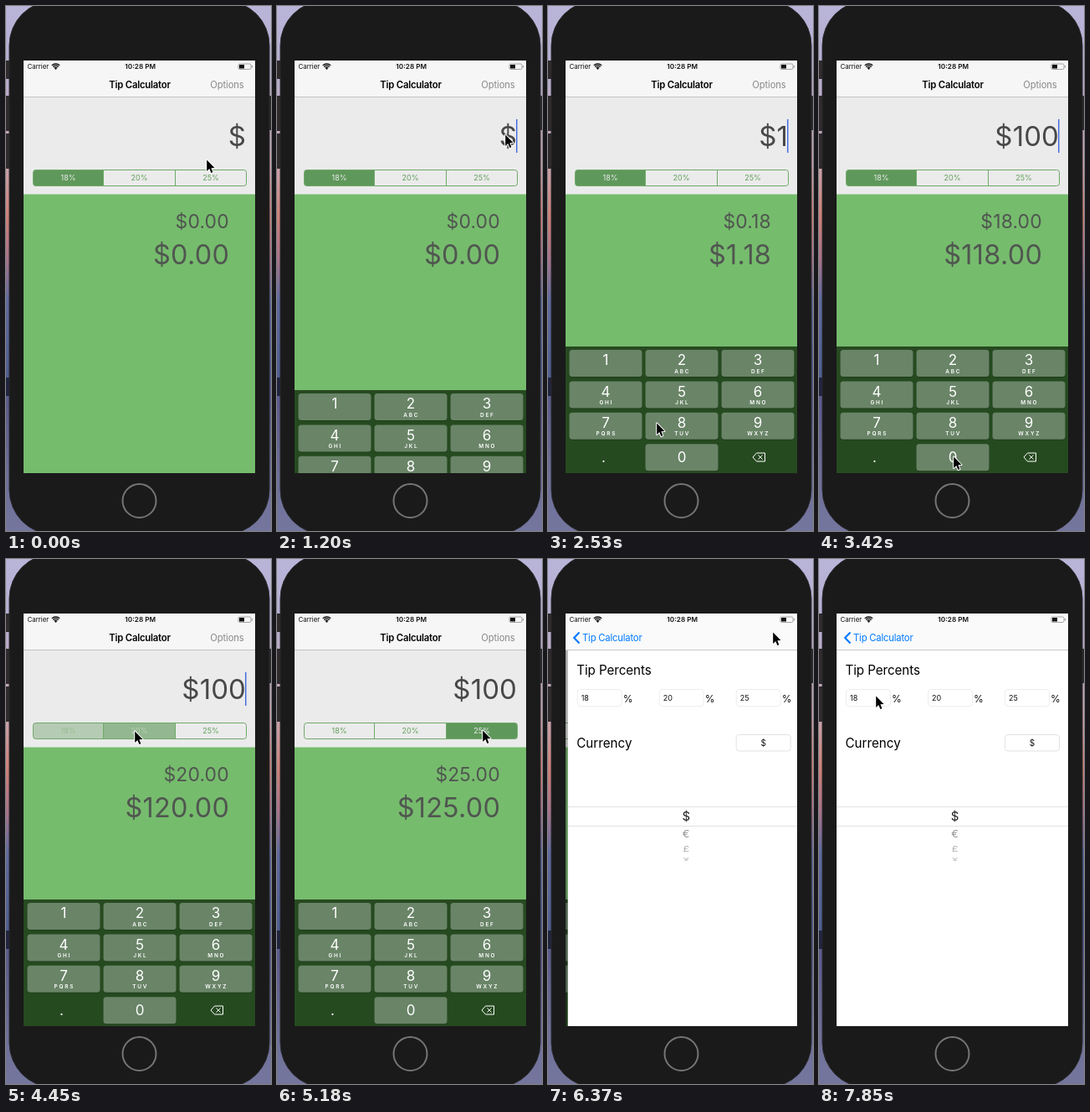
Write an HTML page with a canvas that moves like this. It is 317 by 626 pixels and loops after 8 s.

```html
<!DOCTYPE html>
<html lang="en">
<head>
<meta charset="utf-8">
<title>Tip Calculator</title>
<style>
html, body { margin: 0; width: 100%; height: 100%; overflow: hidden; background: #1a1a1a; }
canvas { display: block; width: 317px; height: 626px; }
</style>
</head>
<body>
<canvas id="stage"></canvas>
<script>
const W = 317, H = 626, LOOP = 8000;
const SCREEN = { x: 21, y: 65, w: 277, h: 492 };
const GREEN = '#76bc6d', SEGMENT = [95, 152, 91], PALE = [235, 235, 235], BLUE = '#007aff';
const RATES = [18, 20, 25];
const canvas = document.getElementById('stage');
const ratio = window.devicePixelRatio || 1;
canvas.width = Math.round(W * ratio);
canvas.height = Math.round(H * ratio);
const ctx = canvas.getContext('2d');

// Pointer path: [step, x, y]
const PATH = [
  [0, 239, 182], [2, 200, 262], [3, 186, 287], [6, 272, 152], [9, 272, 152],
  [14, 70, 425], [16, 72, 428], [17, 129, 496], [18, 158, 556], [19, 160, 536],
  [23, 160, 536], [28, 155, 206], [30, 153, 204], [31, 153, 204], [33, 243, 203],
  [34, 245, 203], [37, 268, 86], [43, 268, 86], [49, 85, 150], [50, 72, 159],
  [51, 63, 161], [52, 63, 161], [53, 67, 162]
];

const mix = (a, b, t) => `rgb(${a.map((v, i) => Math.round(v + (b[i] - v) * t))})`;

function rect(x, y, w, h, fill) {
  ctx.fillStyle = fill;
  ctx.fillRect(x, y, w, h);
}

// A band across the full width of the screen
const band = (y, h, fill) => rect(SCREEN.x, y, SCREEN.w, h, fill);

function rounded(x, y, w, h, r, fill, stroke, width = 1) {
  ctx.beginPath();
  ctx.roundRect(x, y, w, h, r);
  if (fill) { ctx.fillStyle = fill; ctx.fill(); }
  if (stroke) { ctx.strokeStyle = stroke; ctx.lineWidth = width; ctx.stroke(); }
}

function line(points, color, width, close) {
  ctx.beginPath();
  points.forEach(([x, y]) => ctx.lineTo(x, y));
  if (close) ctx.closePath();
  ctx.strokeStyle = color;
  ctx.lineWidth = width;
  ctx.stroke();
}

// y is the middle of the capital letters
function text(str, x, y, size, color, { align = 'left', weight = 400, spacing = 0 } = {}) {
  ctx.font = `${weight} ${size}px Inter, "Open Sans", sans-serif`;
  ctx.letterSpacing = spacing + 'px';
  ctx.textAlign = align;
  ctx.fillStyle = color;
  ctx.fillText(str, x, y + size * 0.364);
}

function clipped({ x, y, w, h }, draw) {
  ctx.save();
  ctx.beginPath();
  ctx.rect(x, y, w, h);
  ctx.clip();
  draw();
  ctx.restore();
}

function drawPhone() {
  const sky = ctx.createLinearGradient(0, 0, 0, H);
  [[0, '#b9b5d9'], [0.12, '#b5aed0'], [0.3, '#c9a5ae'], [0.4, '#cf8179'], [0.48, '#a9748a'],
   [0.56, '#606b9f'], [0.7, '#505f92'], [0.76, '#5d5c8c'], [0.9, '#6f7099'], [1, '#74769e']]
    .forEach(([at, color]) => sky.addColorStop(at, color));
  rect(0, 0, W, H, sky);
  rect(0, 443, 6, 22, '#20243f');
  [[65, 22], [107, 42], [152, 42]].forEach(([y, h]) => rect(0, y, 6, h, '#2f2a2c'));
  rect(313, 107, 4, 41, '#2a2628');
  rounded(4, -6, 311, 636, 53, '#1a1a1a', '#29292d', 1);
  ctx.beginPath();
  ctx.arc(159.5, 590, 20, 0, 7);
  ctx.strokeStyle = '#757575';
  ctx.lineWidth = 2;
  ctx.stroke();
}

function drawStatus() {
  text('Carrier', 25.5, 72.5, 8, '#111', { spacing: -0.05 });
  text('10:28 PM', 160.7, 72.5, 8.2, '#111', { align: 'center', weight: 600 });
  ctx.strokeStyle = '#111';
  ctx.lineWidth = 1.3;
  [2.6, 4.8, 7].forEach(r => {
    ctx.beginPath();
    ctx.arc(59.5, 76, r, -Math.PI * 0.74, -Math.PI * 0.26);
    ctx.stroke();
  });
  ctx.beginPath();
  ctx.arc(59.5, 74.8, 1, 0, 7);
  ctx.fillStyle = '#111';
  ctx.fill();
  rounded(278, 69, 15, 6.5, 1.5, null, '#8d8d8d', 0.8);
  rect(279, 70, 6, 4.5, '#111');
  rect(294, 71, 1, 2.5, '#999');
}

function drawCalculatorBar(k) {
  band(65, 44, '#f6f6f6');
  band(108, 1, '#c4c4c4');
  text('Tip Calculator', 160, 94, 11.3, '#000', { align: 'center', weight: 600, spacing: -0.2 });
  const fade = k < 40 ? 0 : k < 41 ? 0.45 : 0.82;
  text('Options', 284.6, 94, 11.2, mix([137, 137, 137], [246, 246, 246], fade), { align: 'right', spacing: -0.1 });
}

function drawSettingsBar() {
  band(65, 44, '#fafafa');
  band(108, 1, '#c8c8c8');
  line([[37.5, 87.5], [31.2, 94], [37.5, 100.5]], BLUE, 2.2);
  text('Tip Calculator', 41, 94, 11.3, BLUE, { spacing: -0.2 });
}

// How strongly each segment is filled
function segmentWeights(k) {
  if (k < 30) return [1, 0, 0];
  if (k < 31) return [0.38, 0.63, 0];
  if (k < 33) return [0, 1, 0];
  if (k < 34) return [0, 0.38, 0.63];
  return [0, 0, 1];
}

function drawSegments(k) {
  const edges = [32.5, 116.5, 202.5, 287.5];
  ctx.save();
  ctx.beginPath();
  ctx.roundRect(32.5, 195.5, 255, 19, 3);
  ctx.clip();
  segmentWeights(k).forEach((weight, i) => {
    const x = edges[i], w = edges[i + 1] - x;
    rect(x, 195, w, 20, mix(PALE, SEGMENT, weight));
    text(RATES[i] + '%', x + w / 2, 205, 9, mix([98, 161, 91], PALE, weight), { align: 'center' });
  });
  ctx.restore();
  rounded(32.5, 195.5, 255, 19, 3, null, '#6fa969');
  [116.5, 202.5].forEach(x => line([[x, 195], [x, 214]], '#6fa969', 1));
}

function caretVisible(k, time) {
  if (k < 8) return false;
  if (k < 15) return time < 1700;
  return k < 22 || Math.floor((time - 3270) / 500) % 2 === 0;
}

function drawKeyboard(k) {
  if (k < 8) return;
  const slide = 52 * Math.exp(-2.4 * (k - 8));
  const top = 406 + (slide < 0.8 ? 0 : slide);
  const letters = ['', 'ABC', 'DEF', 'GHI', 'JKL', 'MNO', 'PQRS', 'TUV', 'WXYZ'];
  const pressed = k === 15 ? 1 : k === 19 || k === 21 ? 0 : -1;
  const key = (digit, col, row, sub) => {
    const x = 25.5 + col * 91, y = top + 4 + row * 37.4;
    rounded(x, y + 0.8, 87, 32, 3.5, '#1b3717');
    rounded(x, y, 87, 32, 3.5, digit === pressed ? '#42643f' : '#698467');
    text(String(digit), x + 43.5, y + (digit ? 12 : 16), 17, '#fff', { align: 'center' });
    if (sub) text(sub, x + 44.3, y + 25.3, 6.4, '#fff', { align: 'center', weight: 600, spacing: 1.8 });
  };
  band(top, 160, '#264a20');
  letters.forEach((sub, i) => key(i + 1, i % 3, Math.floor(i / 3), sub));
  key(0, 1, 3);
  const y = top + 132;
  text('.', 66.5, y, 17, '#fff', { align: 'center' });
  line([[245, y], [249.5, y - 5], [259.5, y - 5], [259.5, y + 5], [249.5, y + 5]], '#fff', 1, true);
  line([[251.5, y - 2.5], [256.5, y + 2.5]], '#fff', 1);
  line([[256.5, y - 2.5], [251.5, y + 2.5]], '#fff', 1);
}

function drawCalculator(k, time) {
  const digits = k < 16 ? '' : k < 20 ? '1' : k < 22 ? '10' : '100';
  const rate = RATES[k < 30 ? 0 : k < 33 ? 1 : 2];
  const bill = Number(digits), tip = bill * rate / 100;
  const money = value => '$' + value.toFixed(2);
  band(109, 116, '#ebebeb');
  band(224.5, 333, GREEN);
  text('$' + digits, 287, 155, 33, '#484848', { align: 'right', spacing: 0.1 });
  if (caretVisible(k, time)) rect(286, 135, 1.5, 40, '#4a6fe0');
  drawSegments(k);
  text(money(tip), 266.8, 256.5, 22.9, '#505650', { align: 'right', spacing: 0.15 });
  text(money(bill + tip), 267.2, 296.5, 32.4, '#505650', { align: 'right', spacing: 0.3 });
  drawKeyboard(k);
}

function drawSettings() {
  rect(21, 109, 300, 448, '#fff');
  text('Tip Percents', 31.5, 132, 15.2, '#000', { spacing: -0.08 });
  text('Currency', 31.5, 219.5, 15.2, '#000');
  [32.5, 130.5, 222.5].forEach((x, i) => {
    rounded(x, 155.5, 53, 20, 3.5, '#fff', '#ededed');
    text(String(RATES[i]), x + 4.5, 165.7, 9, '#111');
    text('%', x + 54.5, 166.3, 12, '#111');
  });
  rounded(222.5, 209.5, 65, 19.5, 3.5, '#fff', '#e2e2e2');
  text('$', 255, 219.5, 10, '#111', { align: 'center' });
  [295, 318].forEach(y => band(y, 1, '#e2e2e2'));
  // Picker rows flatten as they turn away
  [['$', 307, 15, 1, '#222'], ['€', 328, 13, 0.9, '#929292'],
   ['£', 346, 12.5, 0.7, '#aaa'], ['¥', 358.5, 13, 0.38, '#b5b5b5']]
    .forEach(([sign, y, size, squash, color]) => {
      ctx.save();
      ctx.translate(162.5, y);
      ctx.scale(1, squash);
      text(sign, 0, 0, size, color, { align: 'center' });
      ctx.restore();
    });
}

function drawScreen(k, time) {
  if (k < 43) {
    drawCalculator(k, time);
    drawCalculatorBar(k);
  } else {
    const shift = k === 43 ? 2.7 : 0;
    if (shift) {
      ctx.save();
      ctx.translate(-80, 0);
      drawCalculator(k, time);
      ctx.restore();
      band(109, 448, 'rgba(0,0,0,.28)');
    }
    ctx.save();
    ctx.translate(shift, 0);
    drawSettings();
    ctx.restore();
    drawSettingsBar();
  }
  drawStatus();
}

function pointerAt(k) {
  const next = PATH.findIndex(p => p[0] >= k);
  if (next <= 0) return PATH[0].slice(1);
  const [k0, x0, y0] = PATH[next - 1], [k1, x1, y1] = PATH[next];
  const u = (k - k0) / (k1 - k0), e = u * u * (3 - 2 * u);
  return [x0 + (x1 - x0) * e, y0 + (y1 - y0) * e];
}

function drawPointer(k) {
  const [x, y] = pointerAt(k);
  const outline = [[0, 0], [0, 13.4], [3.1, 10.6], [5.2, 15.6], [7.2, 14.8], [5.2, 9.8], [9.3, 9.6]];
  ctx.save();
  ctx.translate(x + 1.2, y + 1.5);
  ctx.lineJoin = 'round';
  line(outline, '#fff', 2, true);
  ctx.fillStyle = '#000';
  ctx.fill();
  ctx.restore();
}

// The picture refreshes about seven times a second
const stepAt = time => Math.min(53, Math.floor(Math.max(time / 150, (time - 11) / 147.8)));

function render(now) {
  const k = stepAt(now % LOOP);
  const time = k < 9 ? k * 150 : 12 + k * 147.8;
  ctx.setTransform(ratio, 0, 0, ratio, 0, 0);
  drawPhone();
  clipped(SCREEN, () => drawScreen(k, time));
  drawPointer(k);
}

let start;
function tick(now) {
  start ??= now;
  render(now - start);
  requestAnimationFrame(tick);
}
render(0);
requestAnimationFrame(tick);
</script>
</body>
</html>
```
